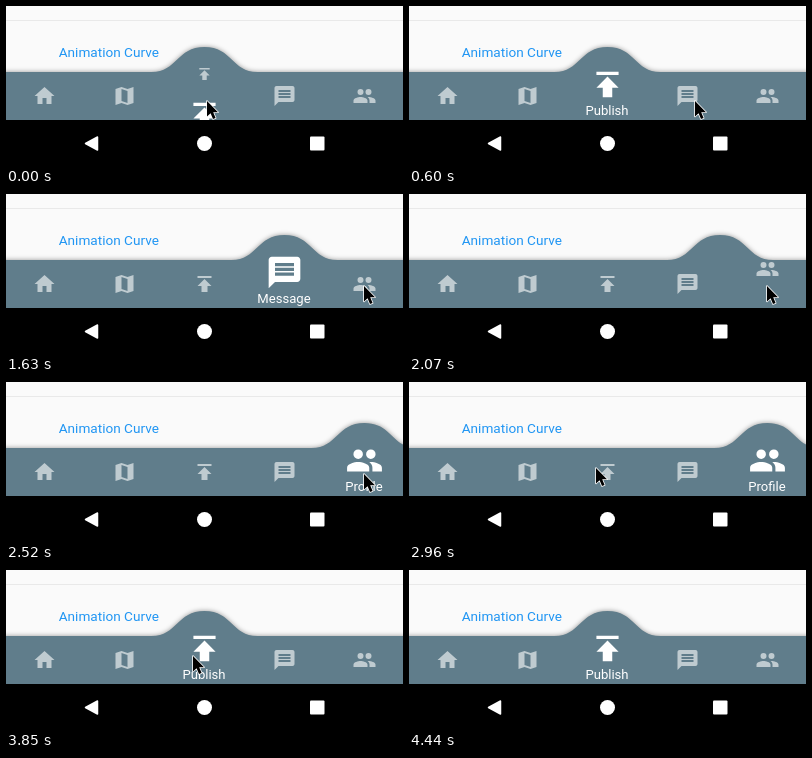
These frames come from a looping animation (397 by 160 pixels, 4880 ms). An HTML page with a canvas:

```html
<!DOCTYPE html>
<html>
<head>
<meta charset="utf-8">
<style>
html, body { margin: 0; width: 397px; height: 160px; overflow: hidden; background: #fafafa; }
canvas { display: block; }
</style>
</head>
<body>
<canvas id="stage" width="397" height="160"></canvas>
<script>
const ctx = document.getElementById('stage').getContext('2d');
const LOOP = 4880, STEP = LOOP / 33;
const BUMP_TIME = 1.6, RISE_TIME = 1.9; // in steps

const items = [
  ['Home', 'M10 20v-6h4v6h5v-8h3L12 3 2 12h3v8z'],
  ['Map', 'M3 5l6-2 6 2.1L21 3v16l-6 2-6-2.1L3 21zM9 5v11.9l6 2.1V7.1z'],
  ['Publish', 'M5 4v2h14V4zm0 10h4v6h6v-6h4l-7-7z'],
  ['Message', 'M20 2H4c-1.1 0-2 .9-2 2v18l4-4h14c1.1 0 2-.9 2-2V4c0-1.1-.9-2-2-2zm-2 12H6v-2h12zm0-3H6V9h12zm0-3H6V6h12z'],
  ['Profile', 'M16 11a3 3 0 1 0 0-6 3 3 0 0 0 0 6zM8 11a3 3 0 1 0 0-6 3 3 0 0 0 0 6zm0 2c-2.33 0-7 1.17-7 3.5V19h14v-2.5C15 14.17 10.33 13 8 13zm8 0-.97.05c1.16.84 1.97 1.97 1.97 3.45V19h6v-2.5c0-2.33-4.67-3.5-7-3.5z']
].map(([label, d]) => ({ label, icon: new Path2D(d) }));

const arrow = new Path2D('M0 0V15.5L3.6 12.2 6 18 8.6 17 6.2 11.2H11z');
const backButton = new Path2D('M79.5 137.5 91.5 131V144z');

// start step, old tab, new tab
const moves = [[-2.43, 4, 2], [5.3, 2, 3], [13.3, 3, 4], [22.09, 4, 2]];
// step, x, y of the pointer
const pointer = [
  [0, 201, 95], [0.5, 201, 95], [4, 286, 95], [7.5, 286, 95], [11, 358, 92],
  [17, 358, 92], [20, 187, 86], [26, 187, 86], [30, 250, 166], [34, 250, 166]
];

const clamp = v => Math.min(1, Math.max(0, v));
const smooth = v => (v = clamp(v), v * v * (3 - 2 * v));
const mix = (a, b, p) => a + (b - a) * p;
const tabX = i => 38.5 + 80 * i;

function drawIcon(i, y, size, alpha) {
  ctx.save();
  ctx.translate(tabX(i), y);
  ctx.scale(size / 24, size / 24);
  ctx.translate(-12, -12);
  ctx.fillStyle = `rgba(255,255,255,${alpha})`;
  ctx.fill(items[i].icon, 'evenodd');
  ctx.restore();
}

function drawText(text, x, y, size, color, align) {
  ctx.font = `${size}px Roboto, sans-serif`;
  ctx.textAlign = align;
  ctx.fillStyle = color;
  ctx.fillText(text, x, y);
}

function drawBar(x) {
  ctx.save();
  ctx.shadowColor = 'rgba(0,0,0,.4)';
  ctx.shadowBlur = 5;
  ctx.fillStyle = '#607d8b';
  ctx.beginPath();
  ctx.moveTo(-20, 66);
  ctx.lineTo(x - 53, 66);
  ctx.bezierCurveTo(x - 27, 66, x - 28, 41, x, 41);
  ctx.bezierCurveTo(x + 28, 41, x + 27, 66, x + 53, 66);
  ctx.lineTo(440, 66);
  ctx.lineTo(440, 125);
  ctx.lineTo(-20, 125);
  ctx.fill();
  ctx.restore();
}

function drawSystemBar() {
  ctx.fillStyle = '#000';
  ctx.fillRect(0, 114, 397, 46);
  ctx.fillStyle = ctx.strokeStyle = '#fff';
  ctx.lineJoin = 'round';
  ctx.lineWidth = 1.5;
  ctx.fill(backButton);
  ctx.stroke(backButton);
  ctx.beginPath();
  ctx.arc(198.5, 137.5, 7.5, 0, 7);
  ctx.fill();
  ctx.beginPath();
  ctx.roundRect(304, 130.5, 14.5, 14, 1);
  ctx.fill();
}

function drawPointer(n) {
  const k = pointer.findIndex(p => p[0] > n);
  const [t0, x0, y0] = pointer[k - 1], [t1, x1, y1] = pointer[k];
  const p = smooth((n - t0) / (t1 - t0));
  ctx.save();
  ctx.translate(mix(x0, x1, p), mix(y0, y1, p));
  ctx.lineWidth = 1.6;
  ctx.strokeStyle = '#fff';
  ctx.stroke(arrow);
  ctx.fillStyle = '#000';
  ctx.fill(arrow);
  ctx.restore();
}

function draw(n) {
  const [start, from, to] = moves.filter(m => m[0] <= n).pop();
  const travel = clamp((n - start) / BUMP_TIME);
  const rise = smooth((n - start - BUMP_TIME) / RISE_TIME);

  ctx.fillStyle = '#fafafa';
  ctx.fillRect(0, 0, 397, 160);
  ctx.fillStyle = '#e9e9e9';
  ctx.fillRect(0, 14, 397, 1);
  drawText('Animation Curve', 52.7, 51, 13.6, '#2196f3', 'left');
  drawBar(mix(tabX(from), tabX(to), smooth(travel)));

  items.forEach((item, i) => {
    if (i !== to) return drawIcon(i, 90, 24, .6);
    const lift = 1 - (1 - travel) ** 2;
    if (rise < 1) drawIcon(i, 90 - 22 * lift, 24 * (1 - rise ** 1.5), .6);
    if (travel < 1) return;
    const drop = 52 * (1 - rise);
    drawIcon(i, 78.5 + drop, 38, 1);
    drawText(item.label, tabX(i) - .5, 109 + drop, 13.1, '#fff', 'center');
  });

  drawSystemBar();
  drawPointer(n);
}

function tick() {
  draw(Math.floor((performance.now() % LOOP + 2) / STEP) % 33);
  requestAnimationFrame(tick);
}
tick();
</script>
</body>
</html>
```
